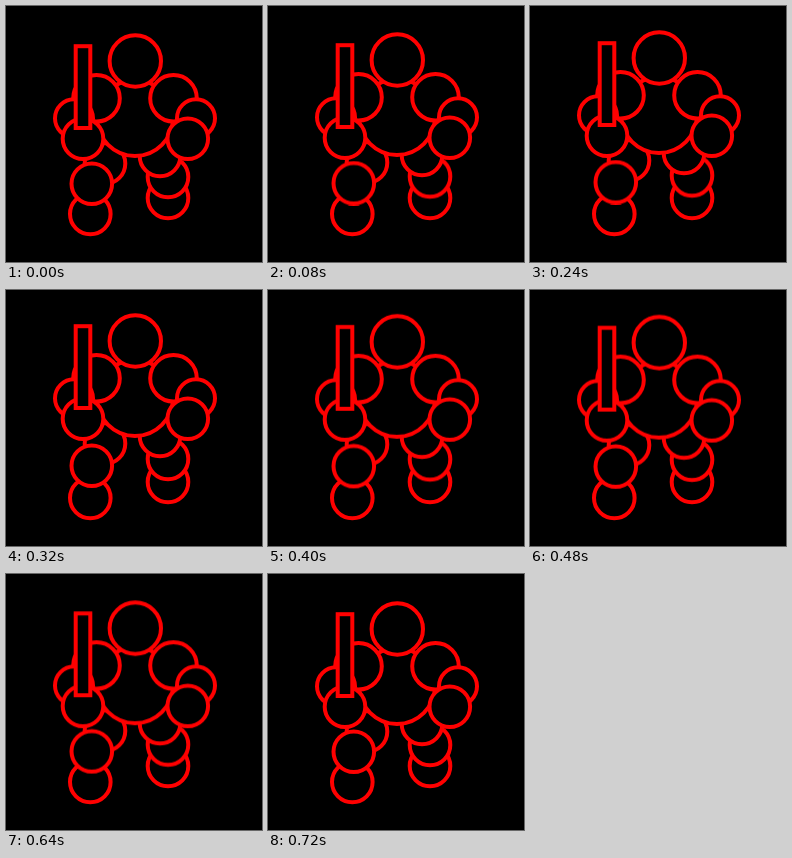
Animation, 256 px wide and 256 px high, one loop 0.8 s. Source, as an HTML page:

```html
<!DOCTYPE html>
<html lang="en">
<head>
<meta charset="utf-8">
<title>Breathing figure</title>
<style>
  html, body {
    margin: 0;
    width: 100%;
    height: 100%;
    overflow: hidden;
    background: #000;
  }
  svg {
    display: block;
    width: 100%;
    height: 100%;
    fill: #000;
    stroke: #f00;
    stroke-width: 4;
  }
  .torso { --lift: -4px; }
  .shin { --lift: -2px; }
  .torso, .shin { animation: breathe 800ms infinite; }

  /* Four steps up, five steps down, then a short rest. */
  @keyframes breathe {
    0% { transform: translateY(0); animation-timing-function: steps(4, end); }
    40% { transform: translateY(var(--lift)); animation-timing-function: steps(5, end); }
    90%, 100% { transform: translateY(0); }
  }
</style>
</head>
<body>
<svg viewBox="0 0 256 256">
  <g class="feet">
    <circle cx="84.3" cy="208" r="20.3"/>
    <circle cx="162" cy="192" r="20.3"/>
  </g>
  <circle class="shin" cx="162" cy="171" r="20.3"/>
  <g class="torso thighs">
    <circle cx="99" cy="157.5" r="20.3"/>
    <circle cx="154" cy="150" r="20.3"/>
  </g>
  <circle class="shin" cx="85.8" cy="177.7" r="20.3"/>
  <g class="torso">
    <circle cx="129" cy="112" r="38"/>
    <circle cx="129.3" cy="55" r="25.7"/>
    <circle cx="90.5" cy="92.3" r="23.3"/>
    <circle cx="167.5" cy="92.3" r="23.3"/>
    <circle cx="68" cy="112.3" r="19"/>
    <circle cx="190" cy="112.3" r="19"/>
    <circle cx="77" cy="132.7" r="20.3"/>
    <circle cx="181.8" cy="132.7" r="20.3"/>
    <rect x="69.7" y="40.2" width="14.6" height="81.8"/>
  </g>
</svg>
</body>
</html>
```
